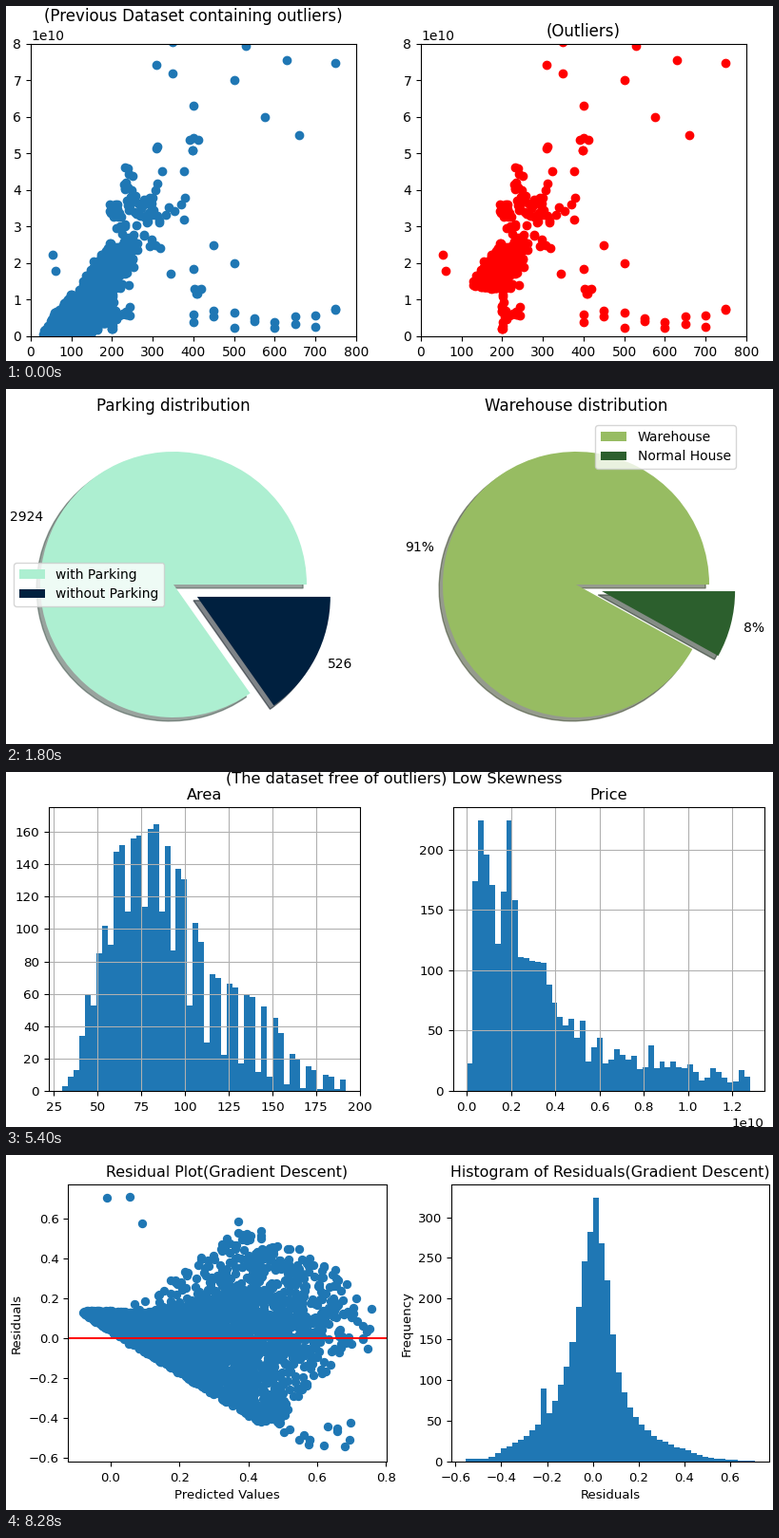
A matplotlib script that plays this animation: 806x374 px, repeating every 9 s.

```python
import numpy as np
import matplotlib.pyplot as plt
from matplotlib.animation import FuncAnimation

W, H, DPI = 806, 374, 100
BLUE = "#1f77b4"
BINS = 50
rng = np.random.default_rng(7)


def curve(x, keys):
    """Geometric interpolation through a few (x, height) points."""
    kx, ky = zip(*keys)
    return np.exp(np.interp(x, kx, np.log(ky)))


def area_counts():
    """Homes by size: sizes are mostly quoted in multiples of five."""
    edges = np.linspace(30, 192, BINS + 1)
    lo, hi = edges[:-1], edges[1:]
    env = curve((lo + hi) / 2, [(31, 4), (38, 17), (44, 58), (54, 100), (61, 150),
                                (84, 165), (100, 130), (116, 72), (140, 57),
                                (151, 47), (161, 23), (190, 7)])
    is_round = hi // 5 > lo // 5
    dip = np.interp(lo, [45, 85, 105, 160], [.75, .7, .4, .12])
    return np.round(env * np.where(is_round, 1, dip))


def price_counts():
    i = np.arange(BINS)
    env = curve(i, [(0, 23), (1, 174), (2, 224), (4, 171), (5, 122), (7, 224),
                    (9, 111), (13, 106), (16, 61), (20, 38), (31, 25), (49, 9)])
    return np.round(env * np.where(i > 17, rng.lognormal(0, .27, BINS), 1))


def residual_counts():
    return np.round(curve(np.arange(BINS),
                          [(0, 3), (3, 4), (6, 16), (12, 46), (13, 90), (14, 60),
                           (18, 147), (20, 246), (22, 324), (24, 222), (26, 110),
                           (28, 66), (33, 27), (38, 14), (45, 2), (49, 1)]))


def patch(n, x0, x1, y0, y1):
    return np.c_[rng.uniform(x0, x1, n), rng.uniform(y0, y1, n)]


def outliers():
    """Area and price / 1e10 of the unusual homes."""
    a = np.clip(rng.normal(190, 32, 480), 108, 268)
    p = .0092 * a * rng.lognormal(0, .22, a.size)
    keep = (p > 1.3) & (p < np.minimum(2.6, .0132 * a))
    big = np.repeat(np.arange(400, 751, 50), 2)
    far = [(350, 8.05), (530, 7.95), (310, 7.43), (630, 7.55), (750, 7.48),
           (350, 7.2), (500, 7), (400, 6.3), (575, 6), (660, 5.5), (378, 3.18),
           (450, 2.5), (500, 2), (400, 1.85), (345, 1.7), (55, 2.23), (60, 1.8)]
    return np.vstack([
        far, np.c_[a, p][keep],
        np.c_[big, rng.uniform(.2, .75, big.size)],
        patch(7, 285, 415, 5, 5.7), patch(10, 228, 252, 3.8, 4.7),
        patch(10, 300, 380, 3.3, 4.8), patch(22, 190, 222, 3.25, 3.62),
        patch(24, 235, 302, 3.3, 3.85), patch(22, 190, 262, 2.3, 3.1),
        patch(18, 275, 320, 2.4, 3.4), patch(5, 400, 420, 1.1, 1.3),
        patch(12, 198, 203, .15, 1.2), patch(12, 205, 245, .4, .8),
    ]) * (1, 1e10)


def homes():
    """Area and price of the ordinary homes."""
    w = AREA / AREA.sum()
    a = 30 + 3.24 * (rng.choice(BINS, 3100, p=w) + rng.random(3100))
    p = .26 * (a / 80) ** 1.5 * rng.lognormal(0, .55, a.size)
    p *= np.where(rng.random(a.size) < .14, rng.uniform(.05, .6, a.size), 1)
    cap = np.minimum(1.28, .0125 * a - .1)
    p = np.where(p > cap, cap * rng.uniform(.4, 1, a.size), p)
    p = np.maximum(p, np.where(a > 168, .35, .02))
    return np.c_[a, p * 1e10]


def residuals():
    """A dense wedge, a looser spread above it and a few strays."""
    x = rng.beta(2, 3.6, 2800) * .84 - .085
    low = np.interp(x, [-.085, .43, .5, .6, .76], [.125, -.42, -.4, -.2, 0])
    core = np.interp(x, [-.085, .1, .2, .35, .76], [.145, .13, .18, .23, .2])
    wedge = np.c_[x, low + (core - low) * rng.beta(1, 1.2, x.size)]
    x = rng.normal(.42, .16, 560)
    x = x[(x > .05) & (x < .76)]
    top = np.interp(x, [.05, .2, .3, .38, .5, .6, .76],
                    [.18, .33, .45, .6, .47, .42, .2])
    spread = np.c_[x, (top + .1) * rng.beta(1.4, 1.3, x.size) - .1]
    strays = [(-.01, .705), (.055, .71), (.09, .575)]
    return np.vstack([wedge, spread, strays,
                      patch(14, .5, .7, -.56, -.38), patch(10, .42, .5, -.43, -.38)])


def scaled(s):
    return plt.rc_context({
        "font.family": "DejaVu Sans", "font.size": 10 * s,
        "axes.linewidth": .8 * s, "axes.titlepad": 6, "axes.labelpad": 4,
        "lines.linewidth": 1.5 * s, "lines.markersize": 6 * s})


def add_axes(x0, x1, y0, y1, title, s=1, gap=3.5):
    """Axes from pixel edges, y counted from the top."""
    ax = fig.add_axes([x0 / W, 1 - y1 / H, (x1 - x0) / W, (y1 - y0) / H])
    ax.set_title(title)
    ax.tick_params(labelsize=10 * s, length=3.5 * s, pad=3.5 * s, width=.8 * s)
    ax.tick_params(axis="x", pad=gap)
    return ax


def scatter_page():
    out = outliers()
    views = [(26, "(Previous Dataset containing outliers)",
              np.vstack([homes(), out]), BLUE),
             (436, "(Outliers)", out, "red")]
    axes = []
    for x, title, pts, color in views:
        ax = add_axes(x, x + 341.7, 39.9, 347.9, title)
        ax.scatter(*pts.T, color=color)
        ax.set(xlim=(0, 800), ylim=(0, 8e10))
        axes.append(ax)
    return axes


def pie(cx, r, title, values, labels, names, colors, loc):
    cy, half = 206, 1.25 * r
    ax = add_axes(cx - half, cx + half, cy - half, cy + half, title)
    wedges, _ = ax.pie(values, labels=labels, colors=colors,
                       explode=(0, .2), shadow=True)
    ax.legend(wedges, names, loc=loc)
    return ax


def parking_page():
    return [pie(176, 140, "Parking distribution", (2924, 526), ("2924", "526"),
                ("with Parking", "without Parking"),
                ("#adefd1", "#00203f"), "center left"),
            pie(599, 140, "Warehouse distribution", (91, 8), ("91%", "8%"),
                ("Warehouse", "Normal House"),
                ("#97bc62", "#2c5f2d"), "upper right")]


def elevator_page():
    with scaled(.98):
        return [pie(180, 137.2, "Elevator distribution", (78, 21), ("78%", "21%"),
                    ("with Elevator", "without Elevator"),
                    ("#f5c7b8", "#ffa177"), "upper right"),
                pie(594, 137.2, "The Most Papular City", (3450, 161),
                    ("3450", "161"), ("Others", "Punak"),
                    ("#f9ad41", "#e87338"), "upper right")]


def bars(ax, counts, lo, hi):
    ax.stairs(counts, np.linspace(lo, hi, BINS + 1), fill=True, color=BLUE)
    m = (hi - lo) * .05
    ax.set_xlim(lo - m, hi + m)


def skew_page():
    s = .97
    with scaled(s):
        left = add_axes(44.5, 372, 37, 336, "Area", s, 4.5)
        bars(left, AREA, 30, 192)
        left.set(ylim=(0, 175.3), xticks=range(25, 201, 25))
        right = add_axes(469.5, 796.5, 37, 336, "Price", s, 4.5)
        bars(right, price_counts(), 1e7, 1.28e10)
        right.set(ylim=(0, 235.2), yticks=range(0, 201, 50))
        for ax in (left, right):
            ax.grid(True, linewidth=.8 * s)
        head = fig.text(408 / W, 1 - 12 / H,
                        "(The dataset free of outliers) Low Skewness",
                        ha="center", va="baseline", fontsize=12 * s)
    return [left, right, head]


def residual_page():
    s = .955
    fifths = np.arange(-3, 5) / 5
    with scaled(s):
        left = add_axes(65, 400, 31, 323, "Residual Plot(Gradient Descent)", s, 4.5)
        left.scatter(*residuals().T, color=BLUE)
        left.axhline(0, color="red")
        left.set(xlabel="Predicted Values", ylabel="Residuals",
                 xticks=fifths[3:], yticks=fifths[:-1],
                 xlim=(-.1245, .802), ylim=(-.6176, .7696))
        right = add_axes(468, 802, 31, 323,
                         "Histogram of Residuals(Gradient Descent)", s, 4.5)
        right.set(xlabel="Residuals", ylabel="Frequency",
                  xticks=fifths[:-1], yticks=range(0, 301, 50), ylim=(0, 340.2))
        bars(right, residual_counts(), -.555, .708)
    return [left, right]


AREA = area_counts()
fig = plt.figure(figsize=(W / DPI, H / DPI), dpi=DPI, facecolor="white")
pages = [make() for make in (scatter_page, parking_page, elevator_page,
                             skew_page, residual_page)]


def show(i):
    for k, page in enumerate(pages):
        for item in page:
            item.set_visible(k == i)
    return []


anim = FuncAnimation(fig, show, frames=len(pages), interval=1800,
                     repeat=True, repeat_delay=0)
plt.show()
```
